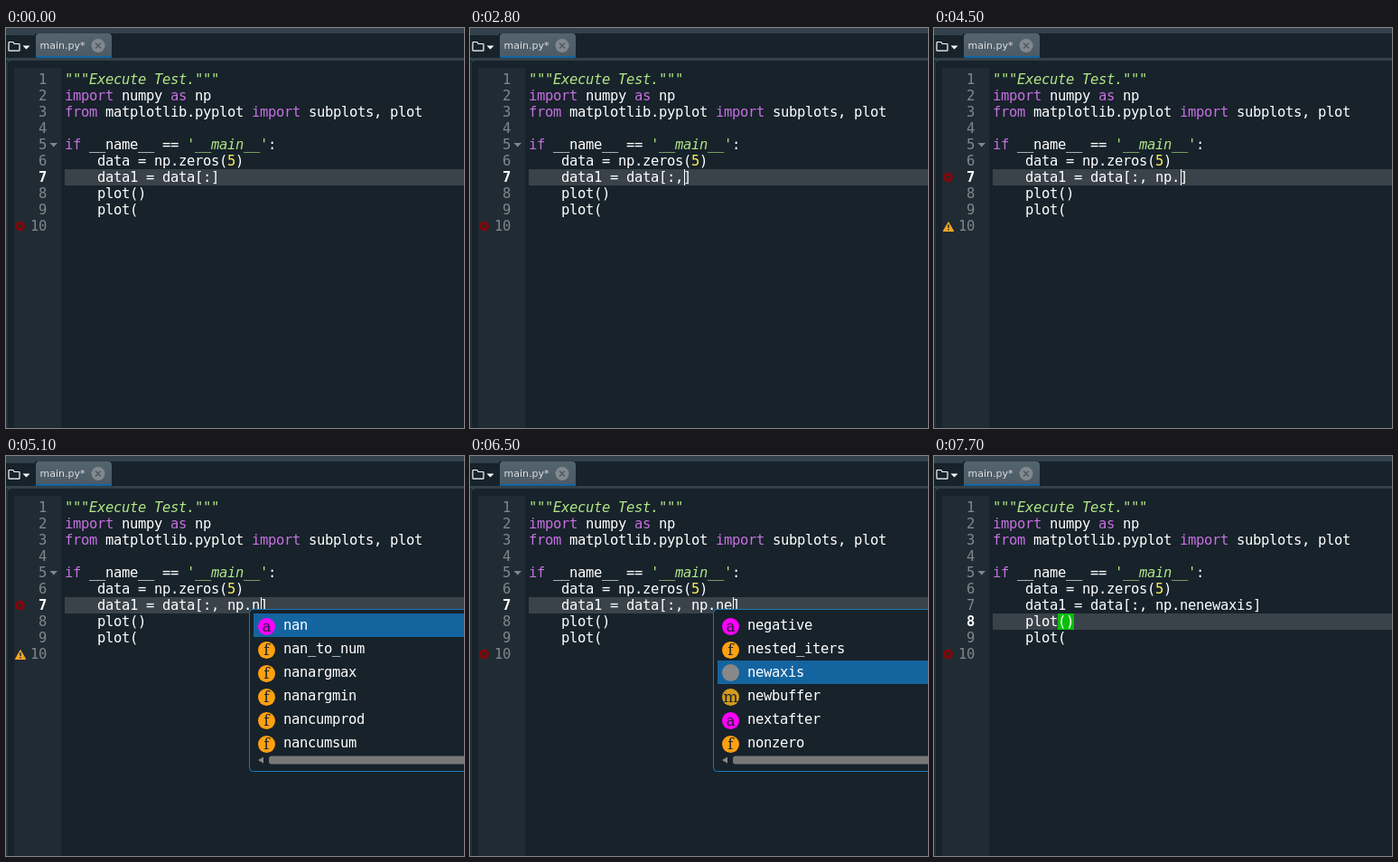
An HTML page for the animation above (8 s loop, 507x442 px).

```html
<!DOCTYPE html>
<html lang="en">
<head>
<meta charset="utf-8">
<title>Editor completion</title>
<style>
  html, body { margin: 0; width: 100%; height: 100%; overflow: hidden; background: #17222a; }
  svg { display: block; }
  text { white-space: pre; fill: #fff; }
  .mono { font: 15.5px "DejaVu Sans Mono", monospace; }
  .tab { font: 11px "DejaVu Sans", sans-serif; fill: #dcdfe1; }
  .glyph { font: 17px "DejaVu Serif", serif; fill: #19232d; text-anchor: middle; }
  .num { fill: #7f878d; }
  .num.current { fill: #fff; font-weight: bold; }
  .k { fill: #c670e0; }
  .s { fill: #b0e686; font-style: italic; }
  .n { fill: #faed5c; }
</style>
</head>
<body>
<svg id="stage" width="507" height="442" viewBox="0 0 507 442">
  <defs>
    <linearGradient id="tabFill" x2="0" y2="1">
      <stop offset="0" stop-color="#54646f"/>
      <stop offset="1" stop-color="#4b5a65"/>
    </linearGradient>
    <g id="error">
      <path d="M-2.2-5h4.4l2.8 2.8v4.4l-2.8 2.8h-4.4l-2.8-2.8v-4.4z" fill="#880508"/>
      <path d="M-2-2l4 4m0-4l-4 4" stroke="#222b33" stroke-width="1.4"/>
    </g>
    <g id="warning">
      <path d="M0-5L5.7 5H-5.7z" fill="#f5a623" stroke="#f5a623" stroke-linejoin="round"/>
      <path d="M0-2.2v3.6m0 1.2v1.5" stroke="#222b33" stroke-width="1.5"/>
    </g>
    <path id="beam" d="M-3.5-8.5H-1.5L0-7.5L1.5-8.5H3.5M0-7.5V7.5M-3.5 8.5H-1.5L0 7.5L1.5 8.5H3.5"/>
  </defs>

  <rect width="507" height="442" fill="#17222a"/>
  <path d="M0 0H507V6H32V8H0z" fill="#32414b"/>
  <rect y="33" width="507" height="3" fill="#32414b"/>
  <path d="M33 33V10q0-4 4-4h76q4 0 4 4v23z" fill="url(#tabFill)"/>
  <rect x="33" y="31" width="84" height="2" fill="#1464a0"/>
  <text class="tab" x="37.5" y="23">main.py*</text>
  <circle cx="102" cy="19.5" r="7.5" fill="#82898e"/>
  <path d="M99 16.5l6 6m0-6l-6 6" stroke="#4f5e69" stroke-width="1.7"/>
  <path d="M3 24.5v-8.3q0-.7.7-.7h4l1.5 2h5.1q.7 0 .7.7v6.3q0 .7-.7.7H3.7q-.7 0-.7-.7z" fill="none" stroke="#fff" stroke-width="1.2"/>
  <path d="M18.5 19.5h8l-4 4z" fill="#fff"/>
  <path d="M5 36q-4 0-4 4V442" fill="none" stroke="#32414b"/>
  <rect x="9" y="44" width="52" height="398" fill="#212b33"/>

  <rect id="line" x="65" width="442" height="18" fill="#3a424a"/>
  <rect id="braces" x="137" y="174" width="18" height="18" fill="#0bbe0b"/>
  <g id="code"></g>
  <path d="M48.5 127h8.5l-4.25 4.5z" fill="#7f878d"/>
  <use id="err" href="#error"/>
  <use id="warn" href="#warning" x="16" y="219.5"/>
  <rect id="caret" y="156" width="1" height="18" fill="#fff"/>

  <g id="popup">
    <rect x="269.5" y="169.5" width="260" height="179" rx="4" fill="#17222a" stroke="#1d78b4"/>
    <rect id="pick" x="274" width="233" height="26" fill="#1464a0"/>
    <g id="items"></g>
    <path d="M285 332.5v7l-6-3.5z" fill="#8b8b8b"/>
    <rect x="291" y="331.5" width="230" height="9" rx="3" fill="#787878"/>
  </g>

  <g id="pointer" fill="none">
    <use href="#beam" stroke="#000" stroke-width="3.4"/>
    <use href="#beam" stroke="#fff" stroke-width="1.5"/>
  </g>
</svg>

<script>
const LOOP = 8000, CHAR = 9, LEFT = 65, ROW = 18, TOP = 48, ITEM = 26;
const $ = id => document.getElementById(id);
const rowTop = n => TOP + (n - 1) * ROW;

function add(parent, tag, attrs, content = '') {
  const el = document.createElementNS('http://www.w3.org/2000/svg', tag);
  for (const key in attrs) el.setAttribute(key, attrs[key]);
  el.innerHTML = content;
  return parent.appendChild(el);
}

// Text on the editor's whole-pixel character grid
function snap(el, x) {
  el.setAttribute('x', [...el.textContent].map((_, i) => x + i * CHAR).join(' '));
}
function addMono(parent, x, y, html, cls = '') {
  const el = add(parent, 'text', { class: 'mono ' + cls, y }, html);
  snap(el, x);
  return el;
}

const mark = (cls, s) => `<tspan class="${cls}">${s}</tspan>`;
const k = s => mark('k', s), str = s => mark('s', s);

const source = [
  str('"""Execute Test."""'),
  k('import') + ' numpy ' + k('as') + ' np',
  k('from') + ' matplotlib.pyplot ' + k('import') + ' subplots, plot',
  '',
  k('if') + ' __name__ == ' + str("'__main__'") + ':',
  '    data = np.zeros(' + mark('n', '5') + ')',
  '',
  '    plot()',
  '    plot(',
  ''
];
const numbers = [], lines = [];
source.forEach((html, i) => {
  const y = rowTop(i + 1) + 14, label = String(i + 1);
  numbers.push(addMono($('code'), 45 - label.length * CHAR, y, label, 'num'));
  lines.push(addMono($('code'), LEFT, y, html));
});

// Completion lists: icon kind, then name
const kinds = { a: '#ff00ff', f: '#ffa010', m: '#d49a1c', '-': '#888' };
const lists = [
  'a abs|a absolute|a add|f add_docstring|f add_newdoc|a add_newdoc_ufunc',
  'a nan|f nan_to_num|f nanargmax|f nanargmin|f nancumprod|f nancumsum',
  'a negative|f nested_iters|- newaxis|m newbuffer|a nextafter|f nonzero'
].map(list => {
  const group = add($('items'), 'g', {});
  list.split('|').forEach((item, i) => {
    const [kind, name] = item.split(' '), y = 174 + i * ITEM;
    const cy = y + (kind === '-' ? 13.5 : 14.5);
    add(group, 'circle', { cx: 288.5, cy, r: 9.5, fill: kinds[kind] });
    if (kind !== '-') add(group, 'text', { class: 'glyph', x: 288.5, y: cy + 5 }, kind);
    addMono(group, 307, y + 18, name);
  });
  return group;
});

// Each track: [start ms, value]
const tracks = {
  typed: [[0, ':'], [2800, ':,'], [3000, ':, '], [3500, ':, n'], [3600, ':, np'], [3800, ':, np.'],
          [5100, ':, np.n'], [5200, ':, np.ne'], [6700, ':, np.nenewaxis']],
  caret: [[0, 0], [1800, 1], [2300, 0], [2800, 1], [4400, 0], [4500, 1], [7200, 0]],
  pointer: [[0, null], [800, [229, 45]], [1000, [235, 78]], [1100, [229, 118]], [1200, [218, 148]],
            [1300, [224.5, 166]], [1700, [330, 186]], [1800, [470, 225]], [1900, null]],
  lint: [[0, 0], [4500, 1], [5800, 0]],
  list: [[0, -1], [4700, 0], [5100, 1], [5200, 2], [6700, -1]],
  pick: [[0, 0], [6300, 1], [6500, 2]],
  current: [[0, 7], [7600, 8]],
  braces: [[0, 0], [7700, 1]]
};

function at(name, t) {
  let value;
  for (const [start, v] of tracks[name]) if (t >= start) value = v;
  return value;
}
const show = (el, on) => el.setAttribute('visibility', on ? 'inherit' : 'hidden');

function render(t) {
  const typed = at('typed', t), current = at('current', t), lint = at('lint', t);
  const list = at('list', t), pointer = at('pointer', t);
  const before = '    data1 = data[' + typed;

  lines[6].textContent = before + ']';
  snap(lines[6], LEFT);
  $('caret').setAttribute('x', LEFT + before.length * CHAR + 1);
  show($('caret'), at('caret', t));

  $('line').setAttribute('y', rowTop(current));
  numbers.forEach((el, i) => el.classList.toggle('current', i + 1 === current));
  show($('braces'), at('braces', t));

  $('err').setAttribute('transform', `translate(15.5 ${rowTop(lint ? 7 : 10) + 9})`);
  show($('warn'), lint);

  show($('popup'), list >= 0);
  lists.forEach((el, i) => show(el, i === list));
  $('pick').setAttribute('y', 174 + at('pick', t) * ITEM);

  show($('pointer'), pointer);
  if (pointer) $('pointer').setAttribute('transform', `translate(${pointer})`);
}

const begin = performance.now();
function tick(now) {
  render(Math.max(0, now - begin) % LOOP);
  requestAnimationFrame(tick);
}
render(0);
requestAnimationFrame(tick);
</script>
</body>
</html>
```
